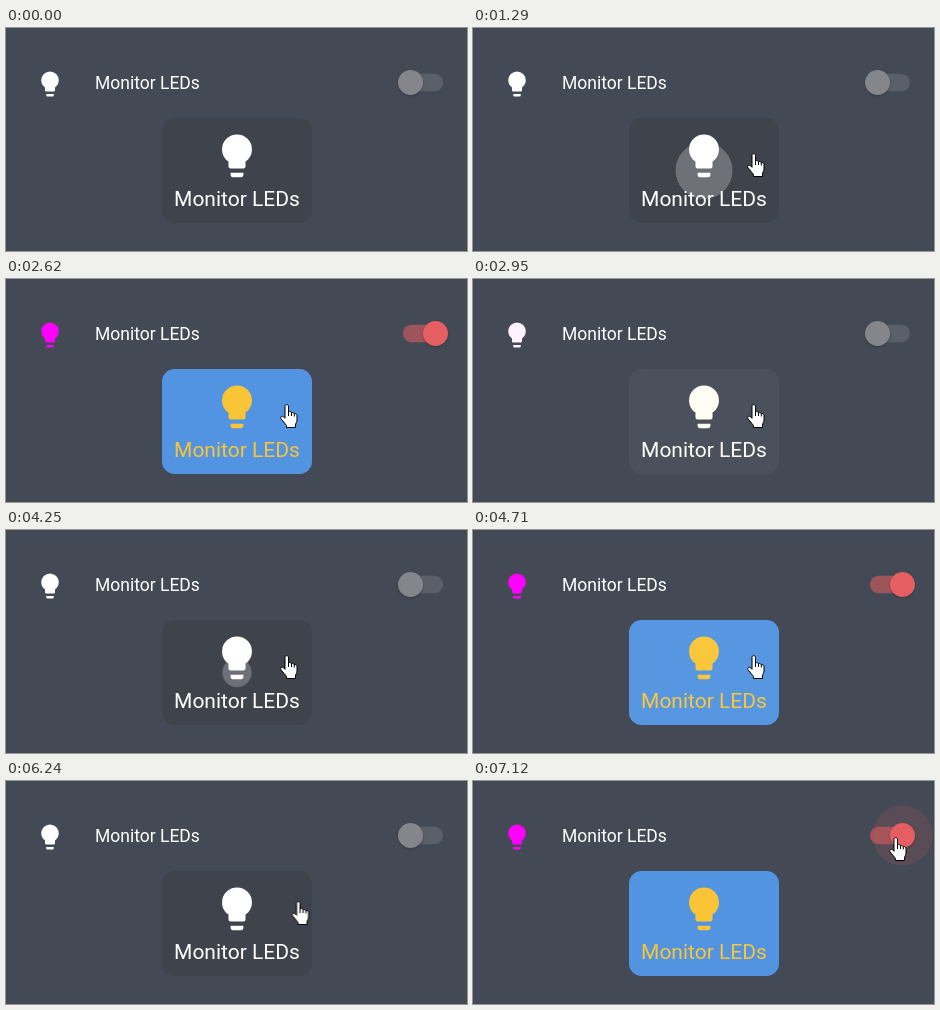
Write an HTML page that moves like this. It is 461 by 223 pixels and loops after 8 s.

```html
<!DOCTYPE html>
<html lang="en">
<head>
<meta charset="utf-8">
<title>Light switch card</title>
<style>
  @property --power { syntax: "<number>"; inherits: true; initial-value: 0; }
  @property --slide { syntax: "<number>"; inherits: true; initial-value: 0; }

  html, body { margin: 0; width: 100%; height: 100%; overflow: hidden; background: #444a55; }
  svg {
    display: block; width: 461px; height: 223px;
    font-family: Roboto, sans-serif;
    animation: power 8s ease-in-out infinite, slide 8s ease-in-out infinite;
  }

  .row-icon { fill: color-mix(in srgb, #f0f calc(var(--power) * 100%), #fff); }
  .row-label { fill: #fff; font-size: 17.5px; }
  .card { fill: color-mix(in srgb, #5294e2 calc(var(--power) * 100%), #3f434b); }
  .content { fill: color-mix(in srgb, #f9c536 calc(var(--power) * 100%), #fff); }
  .card-label { font-size: 21px; text-anchor: middle; }

  .track { fill: color-mix(in srgb, #9d545b calc(var(--slide) * 100%), #5b5f69); }
  .knob {
    fill: color-mix(in srgb, #e55e62 calc(var(--slide) * 100%), #85868c);
    transform: translateX(calc(var(--slide) * 25px));
  }
  .thumb { filter: drop-shadow(0 1px 1px rgb(0 0 0 / .25)); }
  .halo { opacity: 0; animation: halo 8s linear infinite; }

  .ripple { fill: #fff; transform-origin: 231px 142.5px; animation: ripple 8s linear infinite; }
  .pointer { fill: #fff; stroke: #000; stroke-linejoin: round; animation: pointer 8s infinite; }

  @keyframes power {
    0%, 16.875% { --power: 0; }
    20.625%, 33.75% { --power: 1; }
    37.5%, 55.125% { --power: 0; }
    58.875%, 68.5% { --power: 1; }
    72.25%, 85.25% { --power: 0; }
    89%, 100% { --power: 1; }
  }
  @keyframes slide {
    0%, 16.875% { --slide: 0; }
    18%, 33.75% { --slide: 1; }
    34.875%, 55.125% { --slide: 0; }
    56.25%, 68.5% { --slide: 1; }
    69.625%, 84% { --slide: 0; }
    85.125%, 100% { --slide: 1; }
  }
  @keyframes ripple {
    0%, 16.124% { transform: scale(0); opacity: .25; }
    16.125% { transform: scale(.305); opacity: .25; }
    18.5% { transform: scale(1); opacity: .2; }
    20.625%, 32.74% { transform: scale(1); opacity: 0; }
    32.75% { transform: scale(0); opacity: .25; }
    35.4% { transform: scale(1); opacity: .2; }
    37.5%, 53.124% { transform: scale(1); opacity: 0; }
    53.125% { transform: scale(.155); opacity: .25; }
    56.25% { transform: scale(1); opacity: .2; }
    58.875%, 67.49% { transform: scale(1); opacity: .035; }
    67.5% { transform: scale(0); opacity: .25; }
    70.1% { transform: scale(1); opacity: .2; }
    72.25%, 100% { transform: scale(1); opacity: 0; }
  }
  @keyframes halo {
    0%, 82% { opacity: 0; }
    83%, 83.9% { opacity: .05; }
    86.5%, 100% { opacity: .13; }
  }
  @keyframes pointer {
    0%, 9.124% { transform: translate(60px, 110px); }
    9.125% { transform: translate(47px, 85px); animation-timing-function: ease-out; }
    13.875%, 77.999% { transform: none; }
    78% { transform: translate(11.5px, -5px); animation-timing-function: ease-in-out; }
    82.5%, 100% { transform: translate(142px, -69px); }
  }
</style>
</head>
<body>
<svg viewBox="0 0 461 223">
  <defs>
    <path id="bulb" d="M12 2A7 7 0 0 0 5 9C5 11.4 6.2 13.5 8 14.7V17A1 1 0 0 0 9 18H15A1 1 0 0 0 16 17V14.7C17.8 13.5 19 11.4 19 9A7 7 0 0 0 12 2M9 21A1 1 0 0 0 10 22H14A1 1 0 0 0 15 21V20H9Z"/>
    <clipPath id="card-shape"><rect x="156" y="90" width="150" height="105" rx="12.5"/></clipPath>
  </defs>

  <use class="row-icon" href="#bulb" transform="translate(29 41) scale(1.25)"/>
  <text class="row-label" x="89" y="61">Monitor LEDs</text>

  <rect class="track" x="397" y="45.75" width="40" height="17.5" rx="8.75"/>
  <g class="knob">
    <circle class="halo" cx="404.5" cy="54.5" r="30"/>
    <circle class="thumb" cx="404.5" cy="54.5" r="12.5"/>
  </g>

  <g clip-path="url(#card-shape)">
    <rect class="card" x="156" y="90" width="150" height="105"/>
    <g class="content">
      <use href="#bulb" transform="translate(205.4 102.2) scale(2.133)"/>
      <text class="card-label" x="231" y="178">Monitor LEDs</text>
    </g>
    <circle class="ripple" cx="231" cy="142.5" r="92"/>
  </g>

  <g class="pointer">
    <path transform="translate(274 125)" d="M5 2.2C5 .2 8.5 .2 8.5 2.2V8C9.5 7.2 11.3 7.5 11.5 8.8C12.5 8.2 14 8.6 14.3 9.8C15.6 9.3 17 10 17 11.6V16C17 18 15.5 19.5 15.5 21V23.5H6.5V21.5L1.2 15C-.3 13 2 11.3 3.5 12.8L5 14.3ZM8.5 8V12M11.5 8.8V12M14.3 9.8V12.5"/>
  </g>
</svg>
</body>
</html>
```
